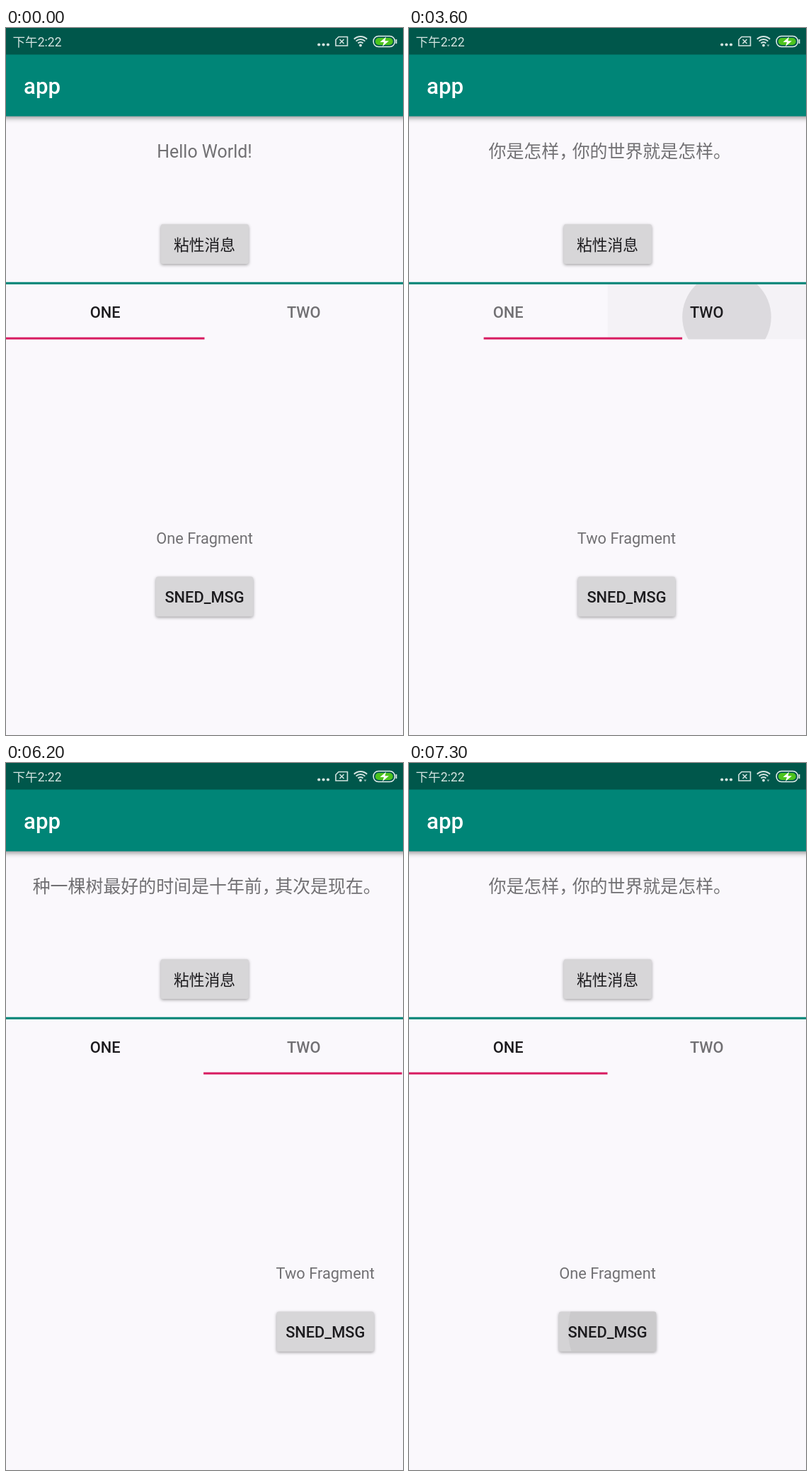
These frames come from a looping animation (561 by 998 pixels, 8 s). An HTML page with a canvas:

```html
<!DOCTYPE html>
<html lang="zh">
<head>
<meta charset="utf-8">
<style>
html, body { margin: 0; width: 100%; height: 100%; overflow: hidden; background: #faf8fc; }
canvas { display: block; width: 561px; height: 998px; }
</style>
</head>
<body>
<canvas id="stage" width="561" height="998"></canvas>
<script>
const ctx = document.getElementById('stage').getContext('2d');
const W = 561, H = 998, MID = W / 2, LOOP = 8000, STEP = 100;
const TO_TWO = 3509, TO_ONE = 6186;
const BG = '#faf8fc', TEAL = '#008577', DARK = '#1c1b1e', GREY = '#717073', ICON = '#d3e3e0';
const QUOTE_A = '你是怎样，你的世界就是怎样。';
const QUOTE_B = '种一棵树最好的时间是十年前，其次是现在。';

const clamp = v => Math.max(0, Math.min(1, v));
const decelerate = u => 1 - (1 - clamp(u)) ** 5;

// Cubic bezier (0.4, 0, 0.2, 1)
function fastOutSlowIn(u) {
  u = clamp(u);
  let lo = 0, hi = 1;
  for (let i = 0; i < 24; i++) {
    const s = (lo + hi) / 2, r = 1 - s;
    if (1.2 * r * r * s + 0.6 * r * s * s + s ** 3 < u) lo = s; else hi = s;
  }
  return lo * lo * (3 - 2 * lo);
}

function rect(x, y, w, h, color) {
  ctx.fillStyle = color;
  ctx.fillRect(x, y, w, h);
}

function circle(x, y, r, color) {
  ctx.fillStyle = color;
  ctx.beginPath();
  ctx.arc(x, y, r, 0, 7);
  ctx.fill();
}

function polygon(points) {
  ctx.beginPath();
  points.forEach(([x, y]) => ctx.lineTo(x, y));
  ctx.closePath();
}

function pill(x, y, w, h, r) {
  ctx.beginPath();
  ctx.roundRect(x, y, w, h, r);
}

function shadow(blur, dy, alpha) {
  ctx.shadowColor = `rgba(0,0,0,${alpha})`;
  ctx.shadowBlur = blur;
  ctx.shadowOffsetY = dy;
}

function text(str, x, y, size, color, weight = 400, align = 'center') {
  ctx.font = `${weight} ${size}px Roboto, "Noto Sans CJK SC", "Noto Sans CJK", sans-serif`;
  ctx.textAlign = align;
  ctx.fillStyle = color;
  ctx.fillText(str, x, y);
}

// Centred Chinese line with narrow punctuation
function quote(str, y) {
  const size = 24.93;
  const advance = c => size * ('，。'.includes(c) ? 0.74 : 1);
  const chars = [...str];
  let x = MID - chars.reduce((sum, c) => sum + advance(c), 0) / 2;
  for (const c of chars) {
    text(c, x, y, size, GREY, 350, 'left');
    x += advance(c);
  }
}

function button(x, y, w, h, raised, ripple) {
  ctx.save();
  shadow(raised ? 7 : 4, raised ? 3 : 1.5, raised ? 0.42 : 0.36);
  ctx.fillStyle = '#d7d6d8';
  pill(x, y, w, h, 3);
  ctx.fill();
  shadow(0, 0, 0);
  if (ripple) {
    ctx.clip();
    rect(x, y, w, h, 'rgba(0,0,0,.015)');
    circle(x + 111, y + 26, 98, '#cbcacc');
  }
  ctx.restore();
}

function statusBar(t) {
  rect(0, 0, W, 37.5, '#00574b');
  text('下午2:22', 9.5, 26, 17.6, ICON, 400, 'left');
  for (let i = 0; i < 3; i++) circle(442.2 + i * 6.4, 23.5, 2.1, ICON);

  ctx.strokeStyle = ICON;
  ctx.lineWidth = 1.6;
  polygon([[470, 12.5], [482.5, 12.5], [482.5, 25], [466, 25], [466, 16.5]]);
  ctx.stroke();
  ctx.beginPath();
  ctx.moveTo(471.5, 16); ctx.lineTo(477.5, 22);
  ctx.moveTo(477.5, 16); ctx.lineTo(471.5, 22);
  ctx.stroke();

  ctx.lineWidth = 2;
  for (const r of [5, 9, 13]) {
    ctx.beginPath();
    ctx.arc(501, 25, r, -Math.PI * 0.75, -Math.PI * 0.25);
    ctx.stroke();
  }
  circle(501, 24.5, 1.9, ICON);
  if (t >= 2300) {
    ctx.fillStyle = '#8fb5af';
    polygon([[505.5, 23.5], [509.5, 23.5], [507.5, 26.5]]);
    ctx.fill();
  }

  ctx.lineWidth = 1.5;
  ctx.strokeStyle = '#e4eeec';
  pill(519.2, 11.5, 30.2, 15, 7);
  ctx.stroke();
  rect(550.6, 16, 1.8, 6, '#e4eeec');
  ctx.fillStyle = '#4cc31d';
  pill(521.8, 14, 25, 10, 5);
  ctx.fill();
  ctx.fillStyle = '#fff';
  polygon([[537, 12.5], [528.5, 20], [534, 20], [532, 26], [541, 18.2], [535.5, 18.2]]);
  ctx.fill();
}

function tabRipple(age, left, x, y) {
  const strength = clamp((age - 8) / 80) * clamp((390 - age) / 300);
  if (age < 0 || !strength) return;
  ctx.save();
  ctx.beginPath();
  ctx.rect(left, 362, MID, 77.5);
  ctx.clip();
  rect(left, 362, MID, 77.5, `rgba(0,0,0,${0.025 * strength})`);
  circle(x, y, age * 0.69, `rgba(0,0,0,${0.1 * strength})`);
  ctx.restore();
}

function page(name, dx, raised, ripple) {
  if (Math.abs(dx) >= W) return;
  text(`${name} Fragment`, MID + dx, 728, 21.8, GREY);
  button(211.8 + dx, 774.5, 137.4, 56.3, raised, ripple);
  text('SNED_MSG', MID + dx, 811, 21.8, DARK, 500);
}

function draw(t) {
  const onTwo = t >= TO_TWO && t < TO_ONE;
  const scroll = decelerate((t - TO_TWO) / 200) - decelerate((t - TO_ONE) / 200);
  const bar = fastOutSlowIn((t - TO_TWO) / 300) - fastOutSlowIn((t - TO_ONE) / 300);

  rect(0, 0, W, H, BG);
  ctx.save();
  shadow(7, 2, 0.42);
  rect(-10, 37, W + 20, 87.6, TEAL);
  ctx.restore();
  statusBar(t);
  text('app', 25, 93, 31.2, '#fff', 500, 'left');

  if (t < 1900) text('Hello World!', MID, 182.5, 24.93, GREY);
  else quote(t >= 5300 && t < 7200 ? QUOTE_B : QUOTE_A, 183);

  button(218.7, 277, 124.2, 56, false, false);
  text('粘性消息', MID, 313.8, 21.8, DARK, 350);
  rect(0, 358.7, W, 3.1, TEAL);

  tabRipple(t - TO_TWO, MID, 449, 408);
  tabRipple(t - TO_ONE, 0, 140, 405);
  text('ONE', MID / 2, 409.2, 21.8, onTwo ? GREY : DARK, 500);
  text('TWO', MID * 1.5, 409.2, 21.8, onTwo ? DARK : GREY, 500);
  rect(bar * MID, 436.6, MID, 3, '#d81b60');

  const raised = [5300, 7200].includes(t);
  page('One', -W * scroll, raised, t >= 7300);
  page('Two', W * (1 - scroll), raised, false);
}

const start = performance.now();
function tick() {
  const t = (performance.now() - start) % LOOP;
  draw(Math.floor(t / STEP) * STEP);
  requestAnimationFrame(tick);
}
tick();
</script>
</body>
</html>
```
